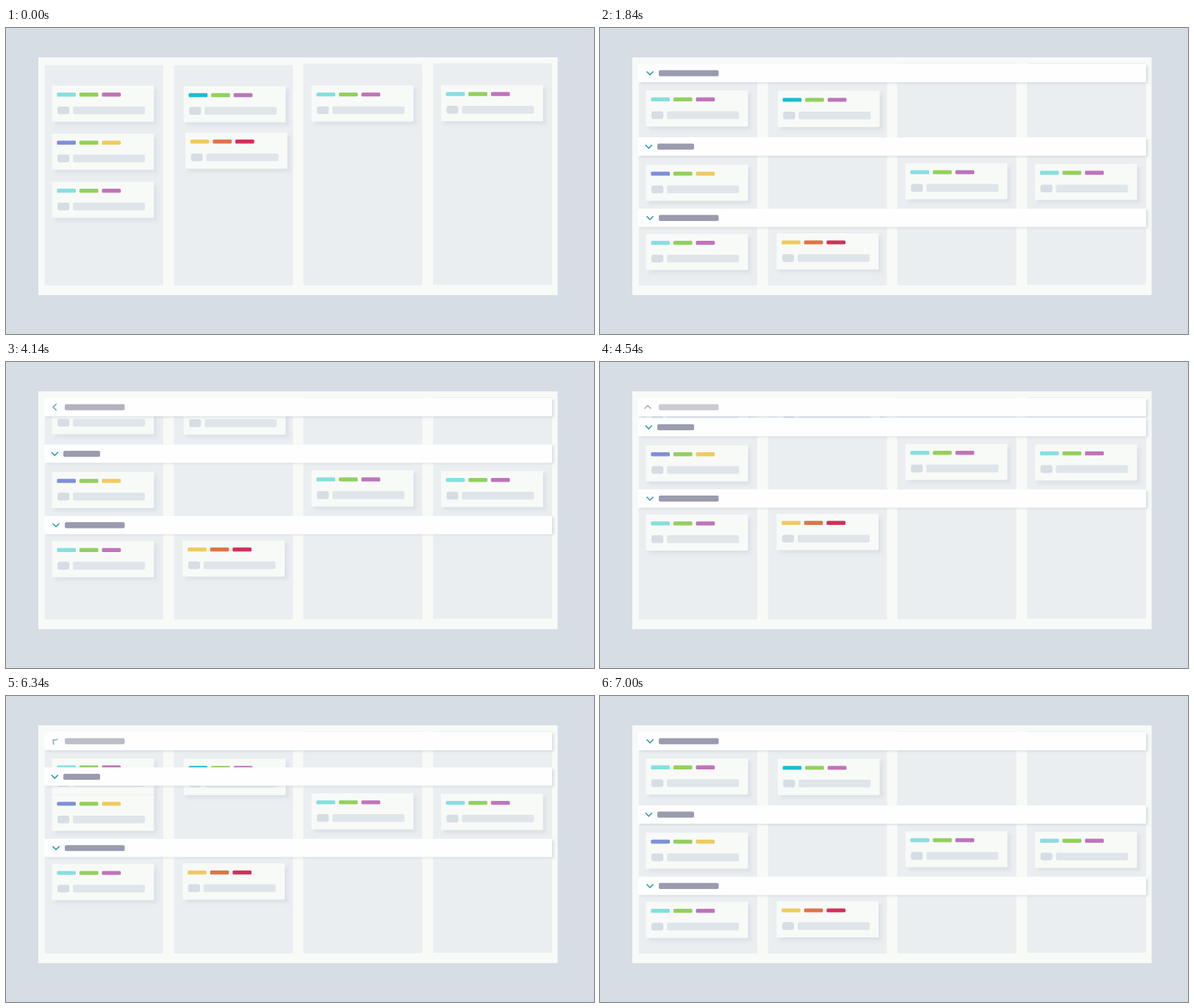
An HTML page with a canvas for the animation above (8000 ms loop, 800 px wide and 417 px high).

```html
<!DOCTYPE html>
<html lang="en">
<head>
<meta charset="utf-8">
<title>Board swimlanes</title>
<style>
html, body { margin: 0; width: 100%; height: 100%; overflow: hidden; background: #d7dde5; }
canvas { display: block; width: 800px; height: 417px; }
</style>
</head>
<body>
<canvas id="stage" width="800" height="417"></canvas>
<script>
const ctx = document.getElementById('stage').getContext('2d');
const LOOP = 8000;
const CYAN = '#86dfe0', GREEN = '#93d05c', PURPLE = '#bf74b9', BLUE = '#7e90d8';
const YELLOW = '#efcb5e', TEAL = '#14c0cc', ORANGE = '#de7448', RED = '#d2305a';
const MIXED = [CYAN, GREEN, PURPLE];

const columns = [[52.5, 50.5, 161.5, 300.5], [228.5, 50.5, 162, 300.5], [404.5, 48.5, 162, 302], [581, 48, 162, 302]];

// x and y run from the plain board to the board with lanes
const cards = [
  { lane: 0, x: [62.5, 62.5], y: [78.5, 85], tags: MIXED },
  { lane: 0, x: [241.7, 241.7], y: [79.2, 85.6], tags: [TEAL, GREEN, PURPLE] },
  { lane: 1, x: [62.5, 62.5], y: [144, 186.2], tags: [BLUE, GREEN, YELLOW] },
  { lane: 1, x: [415.5, 415.5], y: [78.3, 184.2], tags: MIXED },
  { lane: 1, x: [591.8, 591.8], y: [77.7, 185], tags: MIXED },
  { lane: 2, x: [62.5, 62.5], y: [209.5, 280.5], tags: MIXED },
  { lane: 2, x: [244, 240.3], y: [142.5, 279.8], tags: [YELLOW, ORANGE, RED] }
];

const lanes = [
  { y: 49, arrow: 68, x: 80, w: 81.5 },
  { y: 149, arrow: 66.3, x: 78, w: 50 },
  { y: 246.2, arrow: 68, x: 80, w: 81.5 }
];

const lerp = (a, b, p) => a + (b - a) * p;
const span = (t, a, b) => Math.min(1, Math.max(0, (t - a) / (b - a)));
const ease = u => u * u * (3 - 2 * u);
const mix = (a, b, p) => `rgb(${a.map((v, i) => Math.round(lerp(v, b[i], p)))})`;

// Smooth curve through [time, value] keys, flat at both ends
function curve(keys, t) {
  const n = keys.length - 1;
  if (t <= keys[0][0]) return keys[0][1];
  if (t >= keys[n][0]) return keys[n][1];
  const i = keys.findIndex(k => k[0] > t) - 1;
  const slope = j => j <= 0 || j >= n ? 0
    : (keys[j + 1][1] - keys[j - 1][1]) / (keys[j + 1][0] - keys[j - 1][0]);
  const [t0, v0] = keys[i], [t1, v1] = keys[i + 1];
  const d = t1 - t0, u = (t - t0) / d, w = 1 - u;
  return v0 * w * w * (1 + 2 * u) + v1 * u * u * (3 - 2 * u)
    + d * u * w * (slope(i) * w - slope(i + 1) * u);
}

const SPLIT = [[650, 0], [1000, .172], [1270, .38], [1560, .78], [1840, 1]];
const EXPAND = [[5770, 0], [6340, .29], [6540, .46], [6800, .84], [7000, 1]];

function box(x, y, w, h, r, color) {
  ctx.fillStyle = color;
  ctx.beginPath();
  ctx.roundRect(x, y, w, h, r);
  ctx.fill();
}

function shadow(color, blur, dx, dy) {
  ctx.shadowColor = color;
  ctx.shadowBlur = blur;
  ctx.shadowOffsetX = dx;
  ctx.shadowOffsetY = dy;
}

function drawCard(x, y, tags) {
  shadow('rgba(205,213,226,.5)', 4, 4, 4);
  box(x, y, 138.8, 49.3, 1, '#f8faf8');
  shadow('transparent', 0, 0, 0);
  tags.forEach((c, i) => box(x + 6.8 + i * 30.6, y + 9.6, 25.7, 5.4, 1.5, c));
  box(x + 7.5, y + 28.4, 16.2, 10.6, 3, '#d7dde4');
  box(x + 28.6, y + 28.4, 98, 10.6, 2, '#dfe5e9');
}

function drawLane(lane, y, fold) {
  shadow('rgba(190,199,212,.55)', 3, 2.5, 1.5);
  box(52, y, 691, 25, 0, '#fefefe');
  shadow('transparent', 0, 0, 0);
  box(lane.x, y + 8.6, lane.w, 8.2, 2, mix([154, 155, 174], [202, 203, 208], fold));
  ctx.save();
  ctx.translate(lerp(lane.arrow, lane.arrow - 3, fold), y + 12.5);
  ctx.rotate(Math.PI * fold);
  ctx.strokeStyle = mix([46, 157, 181], [172, 176, 180], fold);
  ctx.lineWidth = 1.6;
  ctx.beginPath();
  ctx.moveTo(-4.5, -2.2);
  ctx.lineTo(0, 2.3);
  ctx.lineTo(4.5, -2.2);
  ctx.stroke();
  ctx.restore();
}

function draw(t) {
  const split = curve(SPLIT, t);
  const show = ease(span(t, 500, 850));
  const fold = t < 5000 ? ease(span(t, 3740, 4540)) : 1 - curve(EXPAND, t);
  // First lane's cards slide away ahead of the lanes below
  const tuck = t < 5000 ? ease(span(t, 3660, 4260)) : 1 - ease(span(t, 5770, 6280));
  const lift = 72.8 * fold;

  box(0, 0, 800, 417, 0, '#d7dde5');
  box(44, 40, 706.5, 324, 0, '#f8faf7');
  columns.forEach(c => box(...c, 2, '#ebeef0'));

  ctx.save();
  ctx.beginPath();
  ctx.rect(44, 49, 706, 315);
  ctx.clip();
  for (const c of cards) {
    const up = c.lane ? lift : 40 * tuck;
    drawCard(lerp(...c.x, split), lerp(...c.y, split) - up, c.tags);
  }
  ctx.restore();

  if (show > 0) {
    ctx.globalAlpha = show;
    lanes.forEach((l, i) => drawLane(l, l.y - (i ? lift : 0), i ? 0 : fold));
    ctx.globalAlpha = 1;
  }
}

const start = performance.now();
function tick() {
  draw((performance.now() - start) % LOOP);
  requestAnimationFrame(tick);
}
tick();
</script>
</body>
</html>
```
